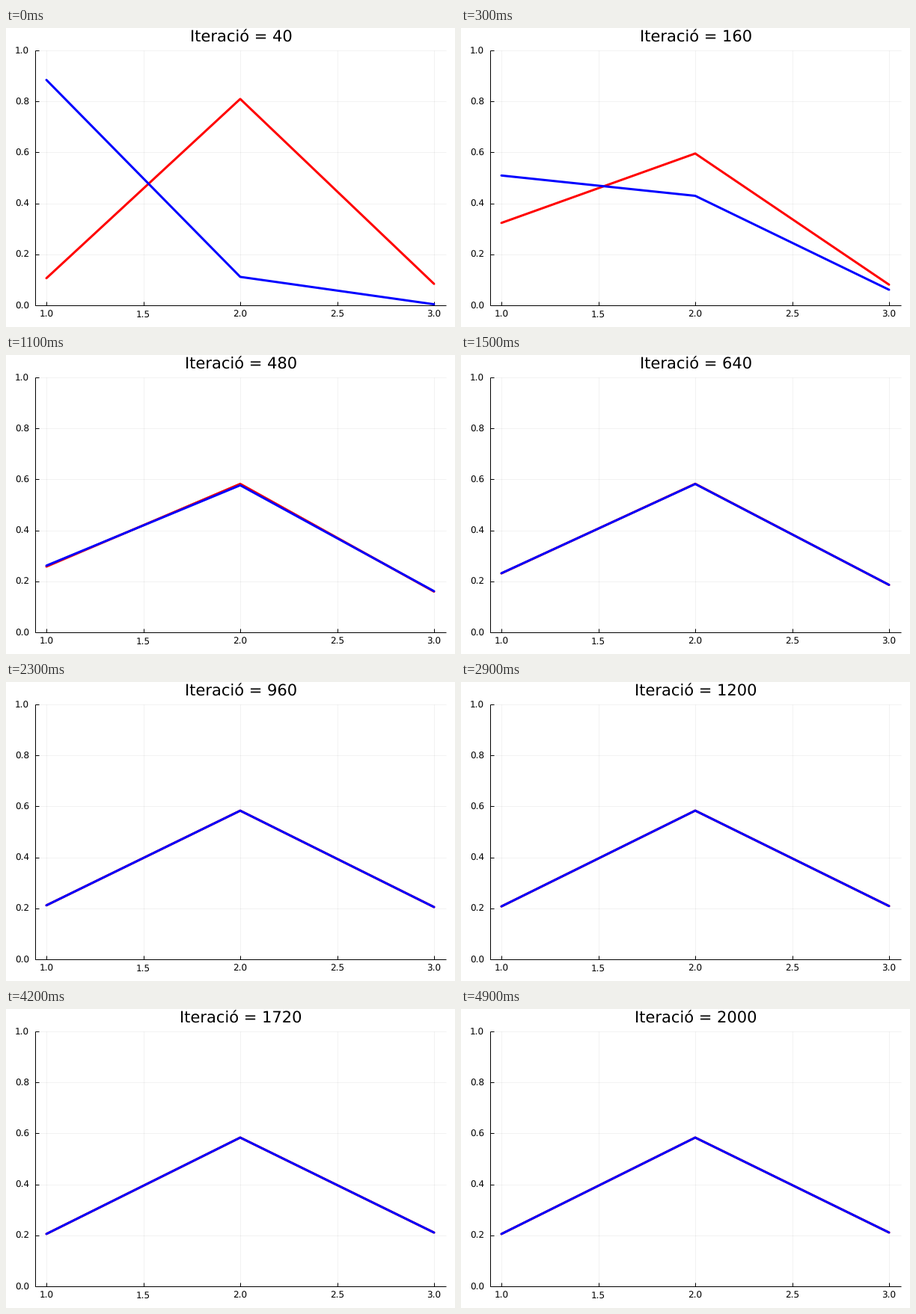
A matplotlib script that plays this animation: 600 by 400 pixels, repeating every 5000 ms.

```python
import numpy as np
import matplotlib.pyplot as plt
from matplotlib.animation import FuncAnimation

PX = 0.72  # points per pixel at 100 dpi
FRAMES, STEP = 50, 40
LEFT, RIGHT, TOP, BOTTOM = 39, 588, 30, 371
LIMIT = np.array([0.2053, 0.5836, 0.2111])

plt.rcParams["font.family"] = "DejaVu Sans"
plt.rcParams["text.hinting"] = "none"
fig = plt.figure(figsize=(6, 4), dpi=100, facecolor="white")
ax = fig.add_axes([0, 0, 1, 1])
ax.set(xlim=(0, 600), ylim=(400, 0))
ax.axis("off")


def x_px(x):
    return 54 + 259 * (x - 1)


def y_px(y):
    return BOTTOM - (BOTTOM - TOP) * y


def smooth_exp(t, knots, values):
    """Exponential of a cubic Hermite curve through log(values)."""
    logs = np.log(values)
    slopes = np.gradient(logs, knots, edge_order=1)
    slopes[0] += (slopes[0] - slopes[1]) / 2
    i = np.clip(np.searchsorted(knots, t) - 1, 0, len(knots) - 2)
    h = knots[i + 1] - knots[i]
    s = (t - knots[i]) / h
    return np.exp((1 + 2 * s) * (1 - s) ** 2 * logs[i]
                  + s * (1 - s) ** 2 * h * slopes[i]
                  + s * s * (3 - 2 * s) * logs[i + 1]
                  + s * s * (s - 1) * h * slopes[i + 1])


MEAN_KNOTS = np.array([40, 160, 320, 640, 960, 2000])
GAP_KNOTS = np.array([40, 160, 320, 640, 2000])


def distributions(t):
    """Both curves relax to LIMIT while the gap between them decays faster."""
    first = smooth_exp(t, MEAN_KNOTS, [0.290, 0.211, 0.111, 0.0262, 0.0065, 6.7e-5])
    third = smooth_exp(t, MEAN_KNOTS, [0.167, 0.140, 0.093, 0.0250, 0.0061, 6.3e-5])
    mean = LIMIT + np.array([first, third - first, -third])
    gap1 = smooth_exp(t, GAP_KNOTS, [0.778, 0.186, 0.0267, 5.6e-4, 4e-11])
    gap2 = smooth_exp(t, GAP_KNOTS, [0.698, 0.166, 0.0346, 8.0e-4, 6e-11])
    gap = np.array([-gap1, gap2, gap1 - gap2])
    return mean + gap / 2, mean - gap / 2


def segment(x0, y0, x1, y1, **style):
    ax.plot([x0, x1], [y0, y1], color="black", lw=PX,
            solid_capstyle="butt", **style)


grid = dict(alpha=0.05, zorder=1)
axis = dict(zorder=2)
for x in np.linspace(1, 3, 5):
    px = x_px(x)
    segment(px, TOP, px, BOTTOM, **grid)
    segment(px, BOTTOM, px, BOTTOM - 5, **axis)
    ax.text(px, 387, f"{x:.1f}", size=12 * PX, ha="center", va="baseline")
for y in np.linspace(0, 1, 6):
    py = y_px(y)
    segment(LEFT, py, RIGHT, py, **grid)
    segment(LEFT, py, LEFT + 5, py, **axis)
    ax.text(31, py + 4.4, f"{y:.1f}", size=12 * PX, ha="right", va="baseline")
segment(LEFT, TOP, LEFT, BOTTOM, **axis)
segment(LEFT, BOTTOM, RIGHT, BOTTOM, **axis)

title = ax.text(314, 18.4, "", size=21 * PX, ha="center", va="baseline")
curves = [ax.plot([], [], color=color, lw=3 * PX, zorder=3, clip_on=False,
                  solid_capstyle="round", solid_joinstyle="round")[0]
          for color in ("#ff0000", "#0000ff")]


def update(frame):
    iteration = STEP * (frame + 1)
    title.set_text(f"Iteració = {iteration}")
    for curve, values in zip(curves, distributions(iteration)):
        curve.set_data(x_px(np.arange(1, 4)), y_px(values))
    return [title, *curves]


anim = FuncAnimation(fig, update, frames=FRAMES, interval=100,
                     repeat=True, repeat_delay=0, blit=False)
plt.show()
```
